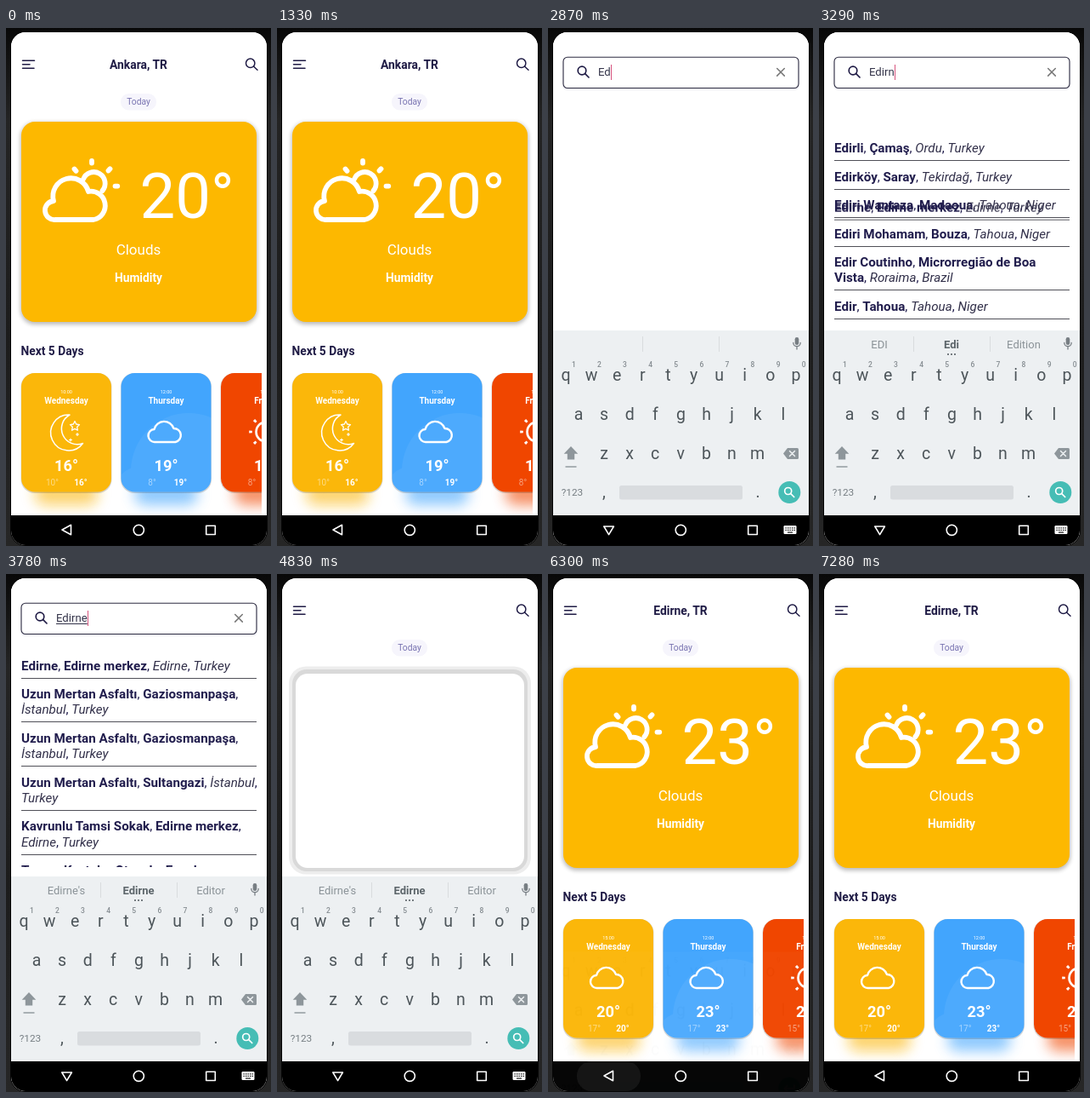
An HTML page that plays this animation: 312x608 px, repeating every 7350 ms.

```html
<!DOCTYPE html>
<html lang="en">
<head>
<meta charset="utf-8">
<title>Weather app</title>
<style>
html, body { margin: 0; width: 100%; height: 100%; overflow: hidden; background: #1a1a1a; }
#stage { position: absolute; left: 0; top: 0; width: 312px; height: 608px; overflow: hidden;
  background: linear-gradient(#080808, #242424 18%, #1c1c1c 60%, #262626);
  font-family: Roboto, "Open Sans", sans-serif; }
#phone { position: absolute; left: 6px; top: 5px; width: 301px; height: 602px; overflow: hidden;
  border-radius: 17px; background: #fff; box-shadow: 0 0 0 1px #050505; }
#view, #search, .layer { position: absolute; left: 0; top: 0; width: 312px; height: 608px; }
#view { left: -6px; top: -5px; }
svg { display: block; overflow: visible; }
text { font-family: Roboto, "Open Sans", sans-serif; }
.mid { text-anchor: middle; }
.b { font-weight: 700; }
.m { font-weight: 500; }
.line { fill: none; stroke-linecap: round; stroke-linejoin: round; }
#search { background: #fff; animation: page 7350ms ease-out infinite; }
#ime { animation: ime 7350ms cubic-bezier(.25, .46, .45, .94) infinite; }
#press { animation: press 7350ms linear infinite; }
#climb { position: absolute; left: 0; right: 0; top: 0; animation: climb 7350ms ease-in-out infinite; }
@keyframes page {
  0%, 21.9% { opacity: 0; transform: translateY(50px); }
  24.76%, 58.1% { opacity: 1; transform: none; }
  60.95%, 100% { opacity: 0; transform: translateY(50px); }
}
@keyframes ime {
  0%, 25.714% { opacity: 0; transform: translateY(60px); }
  29.524%, 83.265% { opacity: 1; transform: none; }
  86.122%, 100% { opacity: 0; transform: translateY(60px); }
}
@keyframes press {
  0%, 80.5% { opacity: 0; }
  82%, 83.5% { opacity: 1; }
  86.5%, 100% { opacity: 0; }
}
@keyframes climb {
  0%, 41.905% { transform: translateY(207px); }
  47.619%, 100% { transform: none; }
}
.typed { position: absolute; left: 59px; top: 43px; height: 18px; font-size: 13.2px; line-height: 18px; color: #34344a; }
.typed i { position: absolute; right: -1px; top: 0; width: 1px; height: 18px; background: #d6537d; }
.typed u { text-underline-offset: 2px; }
.list { position: absolute; left: 18px; top: 89.2px; width: 277px; height: 254.8px; overflow: hidden;
  font-size: 15.2px; line-height: 18.25px; color: #211d4d; white-space: nowrap; }
.list em { color: #32304a; }
.row { padding: 9.55px 0 4.7px; border-bottom: 1px solid #505058; }
.first { padding-top: 33.5px; }
</style>
</head>
<body>
<div id="stage"><div id="phone"><div id="view">
  <svg class="layer" id="home" viewBox="0 0 312 608">
    <defs>
      <filter id="soft" x="-50%" y="-100%" width="200%" height="300%"><feGaussianBlur stdDeviation="8"/></filter>
      <filter id="lift" x="-10%" y="-10%" width="120%" height="120%"><feGaussianBlur stdDeviation="2.5"/></filter>
      <clipPath id="edge"><rect x="6" y="395" width="295" height="177"/></clipPath>
      <clipPath id="blue"><rect x="136" y="405" width="106" height="140" rx="16"/></clipPath>
    </defs>
    <rect width="312" height="572" fill="#fff"/>
    <g class="line" stroke="#1f1b45" stroke-width="1.5">
      <path d="M19.5 38.3H33.5M19.5 42.8H28M19.5 47.3H33"/>
      <circle cx="287.7" cy="41.3" r="5.2"/><path d="M291.7 45.3L296 49.3"/>
    </g>
    <g class="b mid" font-size="13.9" fill="#1f1b45">
      <text x="156" y="48" data-on="0-4200">Ankara, TR</text>
      <text x="156" y="48" data-on="5180-7350">Edirne, TR</text>
    </g>
    <rect x="135" y="77" width="42" height="19.5" rx="9.5" fill="#f6f5fc"/>
    <text class="mid" x="156" y="90.2" font-size="10.3" fill="#7772b0">Today</text>
    <g data-on="4200-5180">
      <rect x="14" y="108.5" width="285" height="244" rx="20" fill="#ededed"/>
      <rect x="18" y="112" width="277" height="237" rx="17" fill="#d9d9d9"/>
      <rect x="22" y="117" width="269" height="228" rx="14" fill="#fff"/>
    </g>
    <g data-on="0-4200 5180-7350">
      <rect x="17" y="111" width="279" height="237" rx="17" fill="#000" opacity=".27" filter="url(#lift)"/>
      <rect x="18" y="110" width="277" height="235" rx="16" fill="#fdb800"/>
      <g class="line" stroke="#fff" stroke-width="5.8">
        <path d="M58 225a11 11 0 0 1-2-22a21 21 0 0 1 41-11a16.5 16.5 0 0 1 6 33z"/>
        <path d="M91 177.5A13.3 13.3 0 1 1 113.5 191"/>
        <path d="M101 156V158.5M80.5 165.5L82.5 167.8M122.5 165.3L120.5 167.5M128.5 185.6H131.3"/>
      </g>
      <g fill="#fff">
        <text x="157.5" y="223" font-size="74.3" data-on="0-4200">20°</text>
        <text x="157.5" y="223" font-size="74.3" data-on="5180-7350">23°</text>
        <text class="mid" x="156" y="266" font-size="17">Clouds</text>
        <text class="mid b" x="156" y="297.5" font-size="13.8">Humidity</text>
      </g>
    </g>
    <text class="b" x="17.5" y="384" font-size="13.8" fill="#1f1b45">Next 5 Days</text>
    <g id="cards" clip-path="url(#edge)"></g>
  </svg>

  <div id="search">
    <svg class="layer" viewBox="0 0 312 608">
      <rect x="17" y="35" width="279" height="38" rx="6" fill="#ececf2"/>
      <rect x="18" y="34.2" width="277" height="36.3" rx="5" fill="#fff" stroke="#2e2d42" stroke-width="1.1"/>
      <g class="line" stroke="#1f1b45" stroke-width="1.7"><circle cx="40" cy="50" r="4.8"/><path d="M43.7 53.7L48 58"/></g>
      <text x="59.5" y="56.6" font-size="13.2" fill="#acacb0" data-on="0-2520">Start typing for find your location...</text>
      <rect x="59" y="43" width="1.3" height="18" fill="#cb7890" data-on="1880-2380"/>
      <path class="line" d="M269.7 47.5L278.3 56.1M278.3 47.5L269.7 56.1" stroke="#777" stroke-width="1.5" data-on="2520-7350"/>
    </svg>
    <div id="typing"></div>
    <div class="list" id="early" data-on="3080-3640"></div>
    <div class="list" id="late" data-on="3640-7350"></div>
  </div>

  <svg class="layer" viewBox="0 0 312 608">
    <rect y="572" width="312" height="36"/>
    <rect id="press" x="34" y="572" width="75" height="35" rx="17" fill="#414141"/>
    <g id="ime">
      <g data-on="0-5250">
        <rect x="6" y="355" width="301" height="31" fill="#edf0f2"/>
        <rect x="6" y="355" width="301" height="29" fill="#e8e9ea" data-on="0-2520"/>
        <path d="M111.5 362V380M201.5 362V380" stroke="#d9dcde"/>
        <rect x="290.7" y="363" width="4.6" height="9" rx="2.3" fill="#777e83"/>
        <path class="line" d="M288.8 369.5a4.2 4.2 0 0 0 8.4 0M293 374V377" stroke="#777e83" stroke-width="1.3"/>
        <g id="hints" class="mid" font-size="13" fill="#8b9398"></g>
      </g>
      <rect x="6" y="385" width="301" height="187" fill="#edf0f2"/>
      <g id="keys" class="mid" fill="#4d555a"></g>
      <g fill="#8e969b">
        <path d="M27 491L35.3 499.8H31.2V506.5H22.8V499.8H18.7z"/><rect x="20.5" y="514.3" width="13" height="1.4"/>
        <path d="M282 493H293.5a1.5 1.5 0 0 1 1.5 1.5V504.5a1.5 1.5 0 0 1-1.5 1.5H282L277 499.5z"/>
      </g>
      <path class="line" d="M284.5 496.5L290.5 502.5M290.5 496.5L284.5 502.5" stroke="#edf0f2" stroke-width="1.5"/>
      <rect x="84" y="537" width="145" height="16.5" rx="2.5" fill="#d9dcdf"/>
      <circle cx="284.3" cy="545" r="13" fill="#46bdb5"/>
      <g class="line" stroke="#fff" stroke-width="1.7">
        <g data-on="0-5250"><circle cx="282.7" cy="543.5" r="4"/><path d="M285.8 546.6L289.7 550.5"/></g>
        <path d="M290 541.5V545.5H278.5M281.5 542.3L278.3 545.5L281.5 548.7" data-on="5250-7350"/>
      </g>
    </g>
    <g class="line" stroke="#fff" stroke-width="1.6">
      <path d="M66 589L76.5 583.3V594.7z" data-on="0-1890 6020-7350"/>
      <path d="M71.6 594.6L65.8 585H77.4z" data-on="1890-6020"/>
      <circle cx="156.3" cy="589.3" r="6.1"/><rect x="235.7" y="584.3" width="10.6" height="10.2"/>
    </g>
    <g data-on="1890-6020">
      <rect x="277.5" y="584" width="15" height="10" rx="1.3" fill="#fff"/>
      <path d="M279.5 586.8H291M279.5 589.3H291" stroke="#000" stroke-width="1.2" stroke-dasharray="1.3 1.2"/>
      <path d="M282 592H288" stroke="#000" stroke-width="1.1"/>
    </g>
  </svg>
</div></div></div>
<script>
const LOOP = 7350;
const $ = id => document.getElementById(id);

// Weather cards
const icons = {
  cloud: '<path d="M-13 12a7.5 7.5 0 0 1-1-15a12 12 0 0 1 23-1a8.1 8.1 0 0 1 2 16z" stroke-width="2.4"/>',
  moon: `<path d="M4-20A21 21 0 1 0 19.5 13.5A18.5 18.5 0 0 1 4-20z" stroke-width="1.5"/>
    <path d="M10-12.5l1.7 3.5 3.8.6-2.8 2.7.7 3.9-3.4-1.8-3.4 1.8.7-3.9-2.8-2.7 3.8-.6z" stroke-width="1.3"/>
    <path d="M13 1.5v3M11.5 3h3M5 8v3M3.5 9.5h3" stroke-width="1.2"/>`,
  sun: `<circle r="11.5" stroke-width="2.6"/>
    <circle r="18" stroke-width="3.6" stroke-linecap="butt" pathLength="80" stroke-dasharray="2 8" stroke-dashoffset="1"/>`
};
const forecast = (cx, on, time, icon, now, low) => `<g data-on="${on}">
  <text class="mid" x="${cx}" y="429" font-size="5.5">${time}</text>
  <g class="line" stroke="#fff" transform="translate(${cx} 474)">${icons[icon]}</g>
  <text class="mid b" x="${cx}" y="519.5" font-size="18.3">${now}°</text>
  <text class="mid" x="${cx - 16.5}" y="536.5" font-size="10" opacity=".5">${low}°</text>
  <text class="mid b" x="${cx + 17}" y="536.5" font-size="10">${now}°</text></g>`;
const card = (x, color, day, before, after) => {
  const cx = x + 53;
  return `<rect x="${x + 16}" y="532" width="74" height="28" rx="12" fill="${color}" opacity=".6" filter="url(#soft)"/>
    <rect x="${x - .5}" y="405" width="107" height="141" rx="16" fill="#000" opacity=".16"/>
    <rect x="${x}" y="405" width="106" height="139.5" rx="16" fill="${color}"/>
    ${day === 'Thursday' ? `<g clip-path="url(#blue)" fill="#fff" opacity=".06">
      <circle cx="215" cy="520" r="68"/><circle cx="160" cy="548" r="34"/></g>` : ''}
    <g fill="#fff"><text class="mid b" x="${cx}" y="441.3" font-size="10">${day}</text>
    ${forecast(cx, '0-4200', ...before)}${forecast(cx, '4200-7350', ...after)}</g>`;
};
$('cards').innerHTML =
  card(18, '#fbb70a', 'Wednesday', ['10:00', 'moon', 16, 10], ['15:00', 'cloud', 20, 17]) +
  card(135.5, '#42a5fd', 'Thursday', ['12:00', 'cloud', 19, 8], ['12:00', 'cloud', 23, 17]) +
  card(253, '#f04600', 'Friday', ['12:00', 'sun', 19, 8], ['12:00', 'sun', 22, 15]);

// Typed text
const strokes = [2520, 2730, 2940, 3080, 3220, 3430, LOOP];
$('typing').innerHTML = [...'Edirne'].map((_, i) => {
  const word = 'Edirne'.slice(0, i + 1), last = i === 5;
  return `<div class="typed" data-on="${strokes[i]}-${strokes[i + 1]}">${last ? `<u>${word}</u>` : word}
    <i ${last ? 'data-on="3430-4000 4500-7350"' : ''}></i></div>`;
}).join('');

// Result rows: two bold parts, then italic ones; "/" breaks the line
const row = s => '<div class="row">' + s.split('|').map((p, i) => {
  const tag = i < 2 ? 'b' : 'em', br = p.startsWith('/') ? '<br>' : '';
  return `${br}<${tag}>${p.replace(/^\//, '').replace('/', '<br>')}</${tag}>`;
}).join(', ') + '</div>';
const city = row('Edirne|Edirne merkez|Edirne|Turkey');
$('early').innerHTML = '<div class="first"></div>' + [
  'Edirli|Çamaş|Ordu|Turkey', 'Edirköy|Saray|Tekirdağ|Turkey',
  'Ediri Wantaza|Madaoua|Tahoua|Niger', 'Ediri Mohamam|Bouza|Tahoua|Niger',
  'Edir Coutinho|Microrregião de Boa/Vista|Roraima|Brazil', 'Edir|Tahoua|Tahoua|Niger'
].map(row).join('') + `<div id="climb">${city}</div>`;
$('late').innerHTML = city + [
  'Uzun Mertan Asfaltı|Gaziosmanpaşa|/İstanbul|Turkey', 'Uzun Mertan Asfaltı|Gaziosmanpaşa|/İstanbul|Turkey',
  'Uzun Mertan Asfaltı|Sultangazi|İstanbul|/Turkey', 'Kavrunlu Tamsi Sokak|Edirne merkez|/Edirne|Turkey',
  'Torvan Kestelar Otoyolu|Esenler'
].map(row).join('');

// Keyboard
const key = (c, x, y, size = 19.5, extra = '') => `<text x="${x}" y="${y}" font-size="${size}" ${extra}>${c}</text>`;
const keyRow = (s, x, y) => [...s].map((c, i) => key(c, x + 30.1 * i, y)).join('');
$('keys').innerHTML = keyRow('qwertyuiop', 21, 414) + keyRow('asdfghjkl', 36, 460) + keyRow('zxcvbnm', 66, 506) +
  [...'1234567890'].map((c, i) => key(c, 30.3 + 30.1 * i, 397.5, 8.5, 'class="m" fill="#858c91"')).join('') +
  key('?123', 28.5, 549, 11.8, 'fill="#767e83"') + key(',', 66, 551) + key('.', 247, 551);
const hints = (on, a, b, c) => `<g data-on="${on}">${key(a, 71, 376, 13)}${key(b, 156, 376, 13, 'class="b" fill="#5c656a"')}
  ${key(c, 241, 376, 13)}<path class="line" d="M152 383H160.5" stroke="#4d555a" stroke-width="2" stroke-dasharray="0 4"/></g>`;
$('hints').innerHTML = hints('2940-3500', 'EDI', 'Edi', 'Edition') + hints('3500-5250', "Edirne's", 'Edirne', 'Editor');

// data-on="from-to ..." in ms becomes hard-switching keyframes
const rules = {};
document.querySelectorAll('[data-on]').forEach(el => {
  const spans = el.dataset.on;
  if (!rules[spans]) {
    const name = 'on' + Object.keys(rules).length;
    const stops = spans.split(' ').map(s => {
      const [from, to] = s.split('-').map(ms => (ms / LOOP * 100).toFixed(3));
      return `${from}%{opacity:1}${to}%{opacity:0}`;
    }).join('');
    rules[spans] = { name, css: `@keyframes ${name}{0%{opacity:0}${stops}100%{opacity:0}}` };
  }
  el.style.animation = `${rules[spans].name} ${LOOP}ms step-end infinite`;
});
const sheet = document.createElement('style');
sheet.textContent = Object.values(rules).map(r => r.css).join('\n');
document.head.append(sheet);
</script>
</body>
</html>
```
